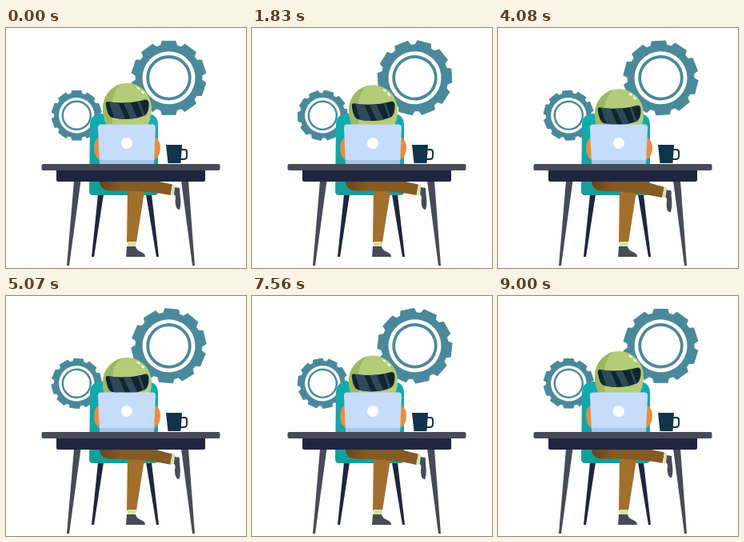
These frames come from a looping animation (300 by 300 pixels, 9030 ms). An HTML page:

```html
<!DOCTYPE html>
<html lang="en">
<head>
<meta charset="utf-8">
<title>At the desk</title>
<style>
html, body { margin: 0; width: 100%; height: 100%; overflow: hidden; background: #fefefe; }
svg { display: block; width: 100%; height: 100%; }
</style>
</head>
<body>
<svg viewBox="0 0 300 300">
  <defs>
    <linearGradient id="chair" x2="0" y2="1">
      <stop stop-color="#14acb0"/><stop offset="1" stop-color="#129e9a"/>
    </linearGradient>
    <linearGradient id="thigh">
      <stop stop-color="#6b4318"/><stop offset=".3" stop-color="#855b24"/>
    </linearGradient>
    <clipPath id="helmet"><path id="shell" d="M121 100a30.5 31 0 0 1 61 0c0 10-3 20-8 27h-45c-5-7-8-17-8-27z"/></clipPath>
    <clipPath id="visor"><path id="glass" d="M127 92Q152 96 174 89.500Q178 89 178.500 94Q179 105 174 109Q156 117 133 112Q127 111 125 97Q124 92 127 92z"/></clipPath>
  </defs>

  <g id="big" fill="#4a899b"></g>
  <g id="small" fill="#4a899b"></g>

  <g fill="#20253f">
    <path d="M115 208h7l-12 78h-3z"/>
    <path d="M175 208h7l9 78h-3z"/>
  </g>
  <path fill="url(#chair)" d="M105 121Q105 108 118 107H177Q190 108 190 121V204Q190 209 185 209H109Q104 209 104 204z"/>

  <g id="head">
    <use href="#shell" fill="#b4cc77"/>
    <g clip-path="url(#helmet)">
      <path fill="#9db864" d="M118 66H151Q134 74 133 94V130H118z"/>
      <path fill="#fff" d="M163 74q4 0 5 3q-3 1-5-3zM169 78q4 1 4 5q-4-1-4-5z"/>
    </g>
    <use href="#glass" fill="#10262f"/>
    <g clip-path="url(#visor)" fill="#2f4958">
      <path d="M128 90h11l12 28h-14zM145 90h9l13 28h-9zM163 88h3l10 28h-3z"/>
    </g>
  </g>

  <path fill="#e68d42" d="M118 135Q110 139 110 150Q110 161 118 166zM184 135Q193 139 193 150Q193 161 184 166z"/>
  <path fill="#c6dcfb" d="M119 120.500H183Q187 120.500 187 124.500L185 170H117L115 124.500Q115 120.500 119 120.500z"/>
  <path fill="#a8c4e6" d="M117 165H185V170H117z"/>
  <circle cx="151" cy="144" r="7" fill="#fff"/>

  <path fill="#12344a" d="M200 146h20l-1.500 23h-16z"/>
  <path fill="none" stroke="#12344a" stroke-width="2" d="M219 152h4q3 0 3 3v5q0 4-4 4h-4"/>

  <path fill="#a36f2d" d="M152 198H174L163 268H151z"/>
  <path fill="#d7e2a5" d="M152 267h11l-1 7h-10z"/>
  <path fill="#474b58" d="M151 273h11q1 5 7 7q5 2 5 6h-24z"/>

  <g id="leg">
    <path fill="url(#thigh)" d="M117 183H160Q185 191 208 195.500L206 209Q180 204 150 203.500H130Q118 203 117 192z"/>
    <path fill="#d7e2a5" d="M208 195.500l3.500 .8l-2.500 12.500l-3.500-.5z"/>
    <path fill="#474b58" d="M211 199l6 1q0 6 1 12q1 10-1 15q-4 0-5-6q-1-5 0-9q0-3-2-4z"/>
  </g>

  <g fill="#474b58">
    <path d="M85 191h8.500L79 297h-3z"/>
    <path d="M219 191h9l8 106h-3z"/>
  </g>
  <path fill="#20253f" d="M63 177H249V190Q249 192 247 192H65Q63 192 63 190z"/>
  <rect x="44.500" y="170" width="223" height="8" rx="2" fill="#474b58"/>
</svg>
<script>
const $ = id => document.getElementById(id);
const TEETH = 10, PITCH = 360 / TEETH;

function gear(id, outer, root, disc, ring, width) {
  const points = [];
  for (let i = 0; i < TEETH; i++) {
    for (const [offset, r] of [[-14, root], [-10.5, outer], [10.5, outer], [14, root]]) {
      const a = (i * PITCH + offset) * Math.PI / 180;
      points.push((r * Math.sin(a)).toFixed(2) + ',' + (-r * Math.cos(a)).toFixed(2));
    }
  }
  $(id).innerHTML = `<polygon points="${points.join(' ')}" stroke="#4a899b" stroke-linejoin="round"/>
    <circle r="${disc}" fill="#fefefe"/>
    <circle r="${ring}" fill="none" stroke="#4a899b" stroke-width="${width}"/>`;
}
gear('big', 46.7, 41.5, 33, 26.3, 3.8);
gear('small', 31.3, 27.8, 22.2, 17.5, 2.4);

const wave = x => (1 - Math.cos(Math.PI * x)) / 2;

// Head drop in pixels at fractions of the loop.
const nod = [[0, 0], [.57, 8], [.7, 2.5], [.84, 5.6], [1, 0]];
function nodAt(x) {
  const i = Math.max(1, nod.findIndex(k => k[0] >= x));
  const [x0, y0] = nod[i - 1], [x1, y1] = nod[i];
  return y0 + (y1 - y0) * wave((x - x0) / (x1 - x0));
}

const start = performance.now();
function draw() {
  const t = Math.max(0, performance.now() - start) % 9030;
  const x = Math.min(1, Math.floor(t / 30) / 300);
  const turn = 2 * PITCH * x;
  $('big').setAttribute('transform', `translate(203.5 62.3) rotate(${turn})`);
  $('small').setAttribute('transform', `translate(88.3 109.3) rotate(${turn})`);
  $('head').setAttribute('transform', `translate(0 ${nodAt(x)})`);
  $('leg').setAttribute('transform', `rotate(${4 * wave(10 * x)} 125 193)`);
  requestAnimationFrame(draw);
}
draw();
</script>
</body>
</html>
```
